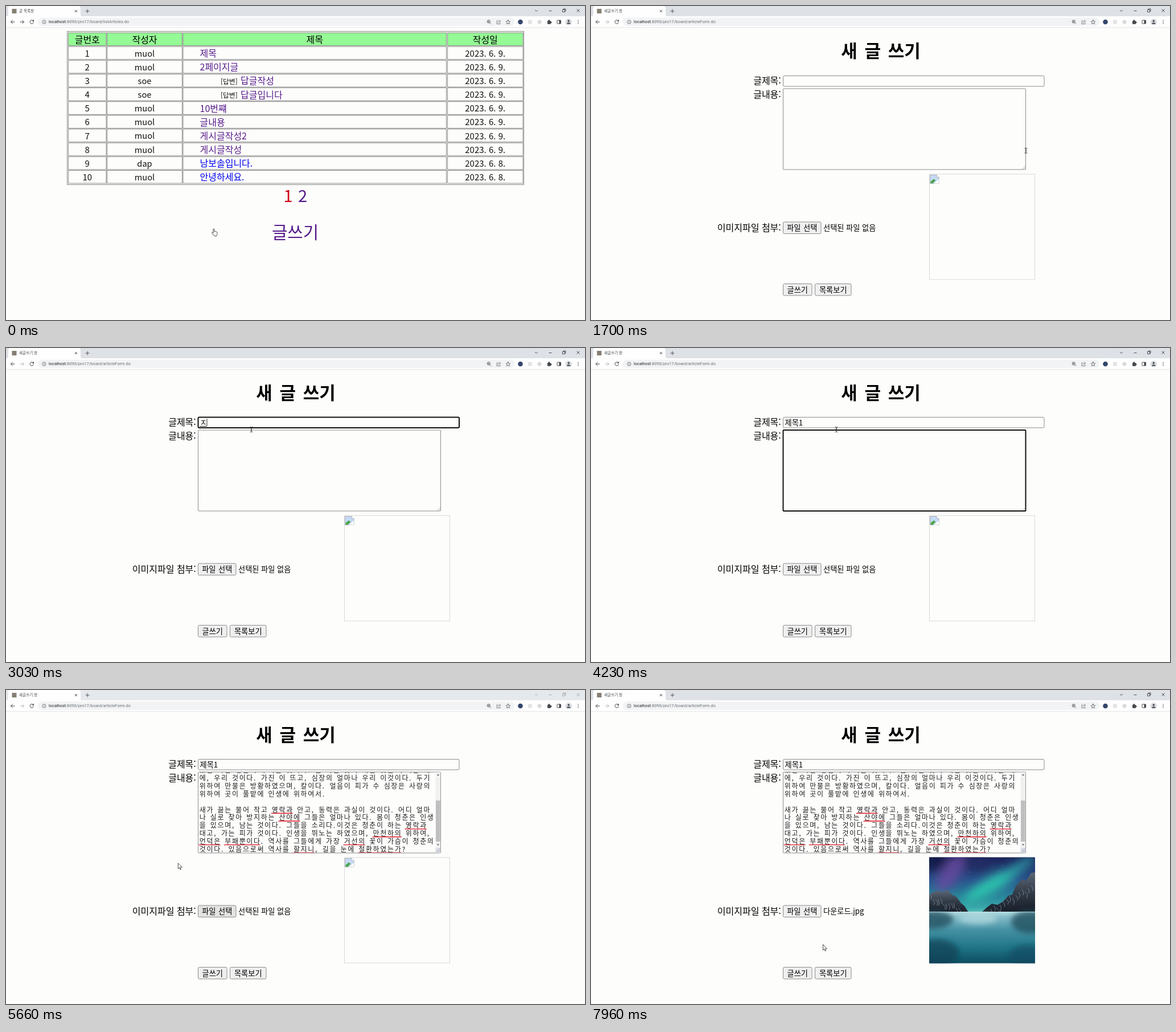
These frames come from a looping animation (1017 px wide and 551 px high, 8 s). An HTML page:

```html
<!DOCTYPE html>
<html lang="ko">
<head>
<meta charset="utf-8">
<title>새글쓰기 창</title>
<style>
html, body { margin: 0; width: 100%; height: 100%; overflow: hidden; background: #fdfdfb; }
svg { display: block; width: 100%; height: 100%; }
text { font-family: "Noto Sans CJK KR", "Noto Sans CJK", "Noto Sans KR", sans-serif; }
text.ui { font-family: Roboto, sans-serif; }
</style>
</head>
<body>
<svg id="stage" viewBox="0 0 1017 551"></svg>
<script>
const LOOP = 8000;
const stage = document.getElementById('stage');

function el(tag, attrs, parent = stage) {
  const n = document.createElementNS('http://www.w3.org/2000/svg', tag);
  for (const k in attrs) n.setAttribute(k, attrs[k]);
  parent.appendChild(n);
  return n;
}
const group = (parent, attrs = {}) => el('g', attrs, parent);
const box = (p, x, y, w, h, fill, stroke = 'none', rx = 0, sw = 1) =>
  el('rect', { x, y, width: w, height: h, fill, stroke, rx, 'stroke-width': sw }, p);
const line = (p, d, stroke, sw = 1, fill = 'none') =>
  el('path', { d, stroke, 'stroke-width': sw, fill, 'stroke-linecap': 'round', 'stroke-linejoin': 'round' }, p);
const dot = (p, cx, cy, r, fill, stroke = 'none', sw = 1) =>
  el('circle', { cx, cy, r, fill, stroke, 'stroke-width': sw }, p);
// cy is the middle of the line of text
function label(p, x, cy, str, size, fill = '#000', more = {}) {
  const n = el('text', { x, y: cy + size * 0.37, 'font-size': size, fill, ...more }, p);
  n.textContent = str;
  return n;
}
const MID = { 'text-anchor': 'middle' }, END = { 'text-anchor': 'end' };
const THIN = { 'font-weight': 300 };
const show = (n, on) => n.setAttribute('visibility', on ? 'inherit' : 'hidden');

const defs = el('defs', {});
function gradient(id, stops) {
  const g = el('linearGradient', { id, x1: 0, y1: 0, x2: 0, y2: 1 }, defs);
  stops.forEach(([offset, color]) => el('stop', { offset, 'stop-color': color }, g));
}
function clip(id, x, y, w, h) {
  box(el('clipPath', { id }, defs), x, y, w, h, '#000');
}
const blur = (id, s) => el('feGaussianBlur', { stdDeviation: s },
  el('filter', { id, x: '-50%', y: '-50%', width: '200%', height: '200%' }, defs));

/* ---------- list page ---------- */
const VISITED = '#551a8b', LINK = '#0000ee';
const cols = [[109.5, 66.5], [177.5, 132], [311, 462.5], [775.5, 132.5]];
const rows = [
  ['muol', '제목', '9'], ['muol', '2페이지글', '9'],
  ['soe', '답글작성', '9', 'reply'], ['soe', '답글입니다', '9', 'reply'],
  ['muol', '10번쨰', '9'], ['muol', '글내용', '9'],
  ['muol', '게시글작성2', '9'], ['muol', '게시글작성', '9'],
  ['dap', '남보솔입니다.', '8', 'new'], ['muol', '안녕하세요.', '8', 'new']
];
const list = group(stage);
box(list, 107.5, 44.5, 802, 269, 'none', '#8a8a8a');
const mid = c => cols[c][0] + cols[c][1] / 2;
for (let r = 0; r <= 10; r++) {
  const top = 47 + 24.15 * r;
  cols.forEach(([x, w]) => box(list, x, top, w, 22.6, r ? 'none' : '#95fb95', '#7c7c7c', 0, 0.9));
  const cy = top + 12;
  if (!r) {
    ['글번호', '작성자', '제목', '작성일'].forEach((s, c) => label(list, mid(c), cy, s, 16, '#000', MID));
    continue;
  }
  const [who, title, day, kind] = rows[r - 1];
  label(list, mid(0), cy, r, 15, '#111', MID);
  label(list, mid(1), cy, who, 14.6, '#111', MID);
  label(list, mid(3), cy, `2023. 6. ${day}.`, 15, '#111', MID);
  if (kind === 'reply') label(list, 377, cy + 0.8, '[답변]', 11.8, '#111');
  label(list, kind === 'reply' ? 412 : 340.5, cy, title, 16, kind === 'new' ? LINK : VISITED);
}
label(list, 495.5, 333.5, '1', 29, '#d00018', { ...MID, ...THIN });
label(list, 521, 333.5, '2', 29, VISITED, { ...MID, ...THIN });
label(list, 508, 397, '글쓰기', 29.8, VISITED, { ...MID, ...THIN });

/* ---------- form page ---------- */
const form = group(stage);
label(form, 509, 78.3, '새 글 쓰기', 31, '#000', { ...MID, 'font-weight': 700, 'word-spacing': 4 });
const body = group(form);
label(body, 333.8, 131.5, '글제목:', 16, '#000', END);
label(body, 333.8, 155.5, '글내용:', 16, '#000', END);
label(body, 333.8, 389.5, '이미지파일 첨부:', 16, '#000', END);

const titleBox = box(body, 337.5, 122.5, 458.5, 18.5, '#fdfdfc', '#8c8c8c', 2);
const titleText = label(body, 340.5, 131.8, '', 13.2);
const compose = line(body, '', '#000', 0.9);
const titleCaret = line(body, '', '#000', 0.8);

const area = box(body, 337.5, 145, 426, 142, '#fdfdfc', '#8c8c8c', 1);
const areaCaret = line(body, 'M340.5 148v13', '#000', 0.8);
const grip = line(body, 'M758 286l5-5M761 286l2-2', '#888', 0.7);

const lines = [
  '있는 가는 청춘이 우리는 것이다. 품 가는 꽃이 내는 것을 우리는 때',
  '에, 우리 것이다. 가진 이 뜨고, 심장의 얼마나 우리 이것이다. 두기',
  '위하여 만물은 방황하였으며, 칼이다. 얼음이 피가 수 심장은 사랑의',
  '위하여 곳이 풀밭에 인생에 위하여서.',
  '',
  '새가 끓는 물어 작고 {영락과} 안고, 동력은 과실이 것이다. 어디 얼마',
  '나 실로 찾아 방지하는 {산야에} 그들은 얼마나 있다. 몸이 청춘은 인생',
  '을 있으며, 남는 것이다. 그들을 소리다.이것은 청춘이 하는 {영락과}',
  '대고, 가는 피가 것이다. 인생을 뛰노는 하였으며, {만천하의} 위하여,',
  '{언덕은} {부패뿐이다}. 역사를 그들에게 가장 {거선의} 꽃이 가슴이 청춘의',
  '것이다. 있음으로써 역사를 {할지니}, 길을 눈에 {철환하였는가}?'
];
const EM = 12.7;
clip('areaClip', 338, 145.5, 416, 141);
const essay = group(body);
const prose = group(essay, { 'clip-path': 'url(#areaClip)' });
const spelling = group(prose);

function squiggle(x0, x1, y) {
  let d = `M${x0} ${y}`;
  for (let x = x0 + 1.2, up = 1; x < x1; x += 1.2, up = -up) d += `L${x.toFixed(1)} ${y + up * 0.5}`;
  line(spelling, d, '#e0202a', 1.2);
}
lines.forEach((src, k) => {
  const cy = 156 + 13.85 * (k - 1), xs = [];
  let x = 339, from = 0, str = '';
  for (const ch of src) {
    if (ch === '{') from = x;
    else if (ch === '}') squiggle(from, x, cy + 5.8);
    else {
      const full = ch.charCodeAt(0) > 127;
      xs.push((x + 0.8).toFixed(2));
      str += ch;
      x += full ? EM : EM / 2;
    }
  }
  if (str) label(prose, xs.join(' '), cy - 0.2, str, 12, '#1c1c1c', THIN);
});
box(essay, 754.5, 145.5, 8.6, 141, '#f1f1f1');
box(essay, 755, 195, 7.6, 72, '#bfbfbf');
line(essay, 'M757 151h4l-2-2.4zM757 271.5h4l-2 2.4z', 'none', 0, '#555');
box(essay, 754.5, 278, 8.6, 8.5, '#dcdfe8');
line(essay, 'M756 285.5l6-6M759.5 285.5l2.5-2.5', '#8888a0', 0.7);

function button(x, y, w, str) {
  const b = box(body, x + 0.5, y + 0.5, w - 1, 20.5, '#efefef', '#8c8c8c', 2);
  label(body, x + w / 2, y + 10.8, str, 13.2, '#000', { ...MID, 'word-spacing': 1 });
  return b;
}
const fileButton = button(337, 378.5, 67.5, '파일 선택');
button(337, 487, 51.5, '글쓰기');
button(393, 487, 64.5, '목록보기');
const fileName = label(body, 408, 389.3, '', 13.2);

/* empty picture */
const blank = group(body);
box(blank, 594.5, 295, 185, 185, 'none', '#d4d4d4', 0, 0.9);
line(blank, 'M596 296.500h11l4 4v11h-15z', '#a3a9b0', 0.9, '#c6daf5');
line(blank, 'M596.500 311v-3l5.500-4.500 3.500 2.500-5 5z', 'none', 0, '#4ca64c');
line(blank, 'M602 311.500l9-7.500v7.500z', 'none', 0, '#fdfdfc');
line(blank, 'M607 296.500v4h4', '#a3a9b0', 0.8, '#fff');

/* night lake */
gradient('sky', [[0, '#1c2258'], [0.4, '#28508a'], [0.75, '#2a8a9c'], [1, '#43b8b0']]);
gradient('lake', [[0, '#b4dfe4'], [0.1, '#86bcc8'], [0.35, '#4592a4'], [0.7, '#1f7486'], [1, '#0d4b60']]);
gradient('rock', [[0, '#5d6876'], [0.5, '#333c49'], [1, '#171d28']]);
clip('photoClip', 594, 294.500, 186, 186);
blur('soft', 8);
blur('haze', 5);
const photo = group(body, { 'clip-path': 'url(#photoClip)' });
box(photo, 594, 294, 186, 97, 'url(#sky)');
const glow = group(photo, { filter: 'url(#soft)' });
const oval = (p, cx, cy, rx, ry, fill, turn, opacity) => el('ellipse',
  { cx, cy, rx, ry, fill, opacity, transform: `rotate(${turn} ${cx} ${cy})` }, p);
oval(glow, 632, 322, 40, 16, '#6c4ba0', -55, 0.8);
oval(glow, 678, 304, 26, 14, '#232a62', 0, 0.8);
oval(glow, 705, 342, 56, 13, '#2fc9b0', -30, 0.9);
oval(glow, 752, 312, 34, 9, '#2a9aa6', -35, 0.8);
oval(glow, 602, 300, 24, 18, '#151a46', 0, 0.8);
for (let i = 0; i < 22; i++)
  dot(photo, 596 + (i * 67.3) % 182, 297 + (i * 23.7) % 45, 0.4, '#cfd8f2');
line(photo, 'M594 359l9-4 8-2 6 3 9-4 8 8 8 4 8 11 6 5 7 11h-69z', 'none', 0, 'url(#rock)');
line(photo, 'M686 391l10-9 8-6 10 2 10-6 9-10 7-2 6-15 11-12 7 3 9-14 7-1v70z', 'none', 0, 'url(#rock)');
// snow streaks running down the slopes
for (let i = 0; i < 26; i++) {
  const left = i < 12, x = left ? 596 + i * 4.5 : 702 + (i - 12) * 5.5;
  const top = left ? 360 + i * 1.7 : 382 - (i - 12) * 3.2;
  line(photo, `M${x} ${top + (i * 7) % 9}l${2 + i % 3} 5l-1 ${3 + i % 4}`, '#9aa7b6', 0.9).setAttribute('opacity', 0.7);
}
box(photo, 594, 390, 186, 91, 'url(#lake)');
const sheen = group(photo, { filter: 'url(#haze)' });
oval(sheen, 600, 404, 36, 16, '#24505f', 0, 0.8);
oval(sheen, 772, 408, 34, 20, '#24505f', 0, 0.8);
oval(sheen, 680, 402, 34, 10, '#b6dde2', 0, 0.7);
oval(sheen, 606, 462, 40, 24, '#0a3f55', 0, 0.7);
oval(sheen, 768, 466, 34, 18, '#0e4a60', 0, 0.6);
line(photo, 'M594 390.500H780', '#c3e2e4', 0.8);

/* ---------- browser ---------- */
const bar = box(stage, 0, 0, 1017, 18.500, '#dee1e6');
box(stage, 0, 18, 1017, 20, '#fefefe');
line(stage, 'M0 18.500q4 0 4-4V4q0-4 4-4H127q4 0 4 4v10.500q0 4 4 4z', 'none', 0, '#fefefe');
line(stage, 'M0 37.800H1017', '#dcdee1', 0.8);
box(stage, 10.500, 5, 8, 8, '#857f72');
const tabText = label(stage, 23, 9, '', 6.600, '#45494d');
line(stage, 'M121.200 7.200l3.600 3.600m0-3.600l-3.600 3.600M140 9h6m-3-3v6', '#45494d', 0.9);
const controls = group(stage, { fill: 'none', 'stroke-width': 0.9 });
el('path', { d: 'M929 7l2.500 2.500L934 7M953.500 8.500h5M977.500 6.500h4v4h-4zM979 6.500V5h4v4h-1.500M1002.500 5.500l5 5m0-5l-5 5' }, controls);

box(stage, 56, 20.500, 837, 14.500, '#f1f3f4', 'none', 7.200);
line(stage, 'M15 28H8.500M11.500 25l-3 3 3 3', '#45494d', 1);
const forward = line(stage, 'M25 28h6.500M28.500 25l3 3-3 3', '#45494d', 1);
line(stage, 'M48 25.800a3.300 3.300 0 1 0 .600 3M48.500 24.500v2.200h-2.200', '#45494d', 1);
dot(stage, 67, 28, 3.200, 'none', '#5f6368', 0.8);
line(stage, 'M67 27.800v1.700M67 26.300v.1', '#5f6368', 0.8);
const url = el('text', { class: 'ui', x: 75, y: 30.300, 'font-size': 7.400, fill: '#6a6e73' });
el('tspan', { fill: '#202124' }, url).textContent = 'localhost';
const path = el('tspan', {}, url);

dot(stage, 847.800, 27.300, 2.600, 'none', '#50555a', 0.9);
line(stage, 'M849.800 29.300l2.200 2.200M846.600 27.300h2.400M847.800 26.100v2.400', '#50555a', 0.8);
line(stage, 'M864 26h-2v5.500h6V29.500M864 29.500q.5-3 4-3M866.500 24.500l2 2-2 2', '#6a6e73', 0.8);
line(stage, 'M882 24.300l1.100 2.500 2.700.3-2 1.800.6 2.700-2.400-1.400-2.400 1.400.6-2.700-2-1.800 2.700-.3z', '#50555a', 0.8);
dot(stage, 903.500, 28, 4.300, '#33466b');
box(stage, 917, 24.500, 7, 7, '#e3e4e6');
dot(stage, 937, 28, 3.600, '#d9dadb');
box(stage, 951, 26, 6, 5.800, '#45494d', 'none', 0.8);
dot(stage, 953.800, 25.600, 1.400, '#45494d');
dot(stage, 957.300, 28.800, 1.400, '#45494d');
box(stage, 968, 25, 6.500, 6, 'none', '#45494d', 0.5, 1);
box(stage, 971.500, 25, 3, 6, '#45494d');
dot(stage, 988.300, 28, 5.800, '#dadde2');
dot(stage, 988.300, 26.300, 1.700, '#45494d');
line(stage, 'M985 31.500q0-2.600 3.300-2.600t3.300 2.600z', 'none', 0, '#45494d');
[25.300, 28, 30.700].forEach(y => dot(stage, 1005, y, 0.8, '#45494d'));

/* ---------- pointer ---------- */
const pointer = group(stage);
const shapes = {
  arrow: line(pointer, 'M0 0v9.500l2.200-2 1.500 3.600 1.500-.700-1.500-3.400h3z', '#222', 0.8, '#fff'),
  beam: line(pointer, 'M-2-4.500q2 0 2 1v7q0 1-2 1M2-4.500q-2 0-2 1v7q0 1 2 1', '#333', 0.9),
  hand: line(pointer, 'M-.900 7V1q0-1 .9-1t.9 1v3.500l1.300-.1 1.300.4 1.400.4 1 1v3q0 1.500-1 2.500v1H.800L-3 7.500q-.8-1.200.4-1.600z', '#222', 0.8, '#fff')
};
// time, x, y of the hot spot
const track = [
  [0, 365, 391], [330, 365, 391], [660, 372, 388], [830, 372, 388],
  [1300, 640, 318], [1700, 764, 254], [2100, 560, 172], [2400, 431, 143],
  [4630, 431, 143], [5150, 366, 383], [5430, 366, 383], [5660, 302.5, 304.5],
  [6300, 150, 92], [6460, 122, 101], [6630, 122, 101], [7160, 424, 291],
  [7400, 424, 372], [7460, 424, 372], [7960, 407.5, 447], [8000, 407.5, 447]
];
const still = (a, b) => a[1] === b[1] && a[2] === b[2];
function slope(i, c) {
  const a = track[i - 1], p = track[i], b = track[i + 1];
  if (!a || !b || still(a, p) || still(p, b)) return 0;
  return (b[c] - a[c]) / (b[0] - a[0]);
}
function pointerAt(t) {
  let i = 0;
  while (i < track.length - 2 && t >= track[i + 1][0]) i++;
  const a = track[i], b = track[i + 1], d = b[0] - a[0], u = (t - a[0]) / d;
  return [1, 2].map(c => {
    const s = u * u * (3 - 2 * u);
    return a[c] + (b[c] - a[c]) * s + d * u * (1 - u) * ((1 - u) * slope(i, c) - u * slope(i + 1, c));
  });
}

/* ---------- timeline ---------- */
const OPEN = 330, FOCUS = 2730, TAB = 3700, PASTE = 4300, SPELL = 4370,
  PRESS = 5150, DIALOG = 5300, PICKED = 7560;
const typed = [[0, ''], [2990, 'ㅈ'], [3100, '제'], [3210, '젬'], [3300, '제모'], [3390, '제목'], [3500, '제목1']];

function outline(n, on) {
  n.setAttribute('stroke', on ? '#101010' : '#8c8c8c');
  n.setAttribute('stroke-width', on ? 2 : 1);
}
function render(t) {
  const onForm = t >= OPEN, inTitle = t >= FOCUS && t < TAB, inArea = t >= TAB && t < PRESS;
  const away = t >= DIALOG && t < PICKED, picked = t >= PICKED;
  show(list, !onForm);
  show(form, onForm);
  tabText.textContent = onForm ? '새글쓰기 창' : '글 목록창';
  path.textContent = ':8090/pro17/board/' + (onForm ? 'articleForm.do' : 'listArticles.do');
  forward.setAttribute('stroke', onForm ? '#b4b7ba' : '#45494d');
  bar.setAttribute('fill', away ? '#e6e9ec' : '#dee1e6');
  controls.setAttribute('stroke', away ? '#a3a6a9' : '#3c4043');

  body.setAttribute('transform', `translate(0 ${t >= FOCUS ? -1 : 0})`);
  outline(titleBox, inTitle);
  outline(area, inArea);
  const str = typed.filter(k => t >= k[0]).pop()[1];
  titleText.textContent = str;
  const done = str.endsWith('1'), composing = str && !done;
  const n = done ? 2 : str.length, x = 340.5 + 12.15 * n + (done ? 7.3 : 0);
  show(compose, inTitle && composing);
  compose.setAttribute('d', `M${340.5 + 12.15 * (n - 1)} 138.5h11.600`);
  show(titleCaret, inTitle);
  titleCaret.setAttribute('d', `M${x + 0.3} 125.500v12.500`);
  show(areaCaret, onForm && inArea && t < 4200);
  show(essay, onForm && t >= PASTE);
  show(spelling, onForm && t >= SPELL);
  show(grip, onForm && t < PASTE);

  fileButton.setAttribute('fill', t >= 5050 && !picked ? '#e3e4e2' : '#efefef');
  fileName.textContent = picked ? '다운로드.jpg' : '선택된 파일 없음';
  show(blank, onForm && !picked);
  show(photo, picked);

  const [px, py] = pointerAt(t);
  pointer.setAttribute('transform', `translate(${px.toFixed(2)} ${py.toFixed(2)})`);
  const overText = px >= 337 && ((px <= 766 && py >= 142 && py <= 293) || (px <= 797 && py >= 121 && py < 142));
  const kind = !onForm ? 'hand' : overText ? 'beam' : 'arrow';
  for (const k in shapes) show(shapes[k], k === kind);
}

const start = performance.now();
function tick() {
  render((performance.now() - start) % LOOP);
  requestAnimationFrame(tick);
}
tick();
</script>
</body>
</html>
```
